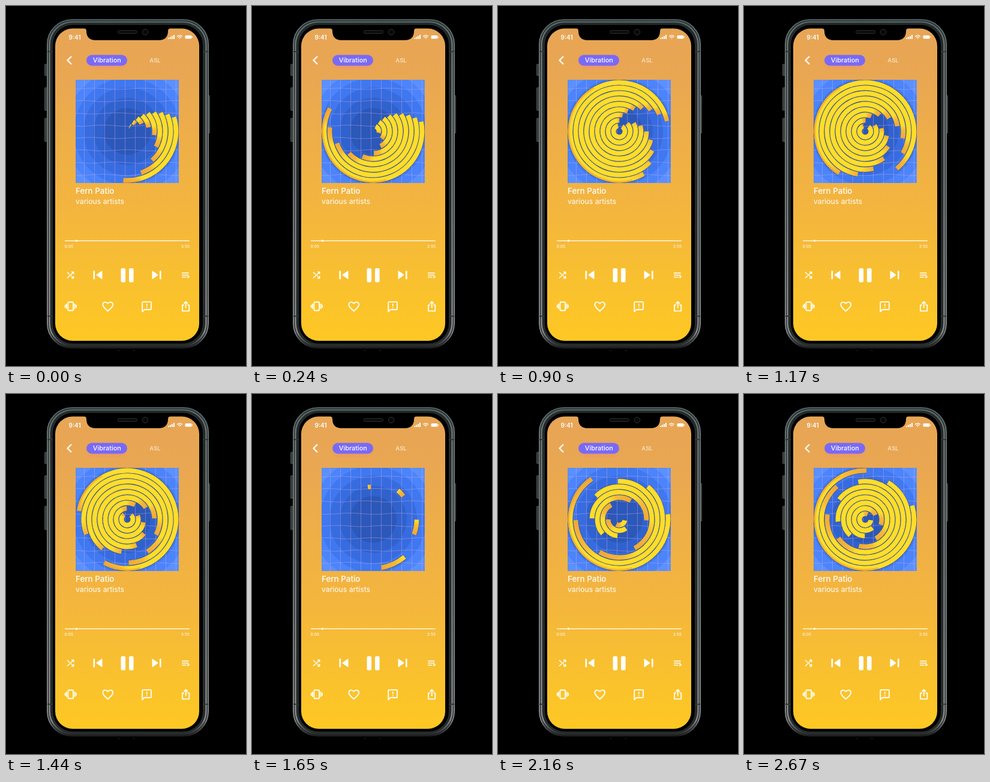
These frames come from a looping animation (400 px wide and 600 px high, 2700 ms). An HTML page with a canvas:

```html
<!DOCTYPE html>
<html lang="en">
<head>
<meta charset="utf-8">
<title>Music player</title>
<style>
html, body { margin: 0; width: 100%; height: 100%; overflow: hidden; background: #000; }
#stage { position: absolute; left: 0; top: 0; width: 400px; height: 600px; overflow: hidden; }
svg, canvas { position: absolute; display: block; }
svg { left: 0; top: 0; }
canvas { left: 116px; top: 123px; }
text { font-family: Inter, "Open Sans", sans-serif; fill: #fff; }
</style>
</head>
<body>
<div id="stage">
<svg width="400" height="600" viewBox="0 0 400 600">
  <defs>
    <linearGradient id="screen" x1="0" y1="0" x2="0" y2="1">
      <stop offset="0" stop-color="#e7a556"/>
      <stop offset=".16" stop-color="#e9a752"/>
      <stop offset=".35" stop-color="#eeae48"/>
      <stop offset=".6" stop-color="#f4b63d"/>
      <stop offset=".78" stop-color="#f8bf31"/>
      <stop offset="1" stop-color="#fec823"/>
    </linearGradient>
    <linearGradient id="metal" gradientUnits="userSpaceOnUse" x1="0" y1="22" x2="0" y2="571">
      <stop offset="0" stop-color="#516363"/>
      <stop offset=".07" stop-color="#687474"/>
      <stop offset=".5" stop-color="#757b7b"/>
      <stop offset=".95" stop-color="#848888"/>
      <stop offset=".985" stop-color="#3c3e3e"/>
      <stop offset="1" stop-color="#151616"/>
    </linearGradient>
    <filter id="soft" x="-30%" y="-80%" width="160%" height="280%"><feGaussianBlur stdDeviation="3"/></filter>
  </defs>
  <rect width="400" height="600"/>

  <g fill="#353a3a" stroke="#626868" stroke-width=".7">
    <rect x="64.5" y="97" width="4" height="19" rx="1"/>
    <rect x="64.5" y="136" width="4" height="38" rx="1"/>
    <rect x="64.5" y="187" width="4" height="39" rx="1"/>
    <rect x="336.5" y="149" width="3" height="63" rx="1"/>
  </g>
  <rect x="69" y="23" width="268" height="547" rx="41" fill="#202424" stroke="url(#metal)" stroke-width="2"/>
  <rect x="72.5" y="26.5" width="261" height="540" rx="38" fill="none" stroke="url(#metal)" stroke-width="2.6"/>
  <rect x="76.5" y="30" width="253" height="534" rx="35" fill="#000" stroke="#272b2b" stroke-width="3"/>
  <path d="M69 76h9M328 76h9M69 517h9M328 517h9" stroke="#303737" stroke-width="2"/>
  <path d="M186 574h4M211 574h4" stroke="#202222"/>

  <rect x="82" y="37.5" width="240" height="520.5" rx="29" fill="url(#screen)"/>
  <path d="M129 37H275Q270 37 270 42C270 52 264 57 255 57H149C140 57 134 52 134 42Q134 37 129 37Z"/>
  <rect x="186.500" y="41" width="32" height="4.500" rx="2.200" fill="#080808" stroke="#343434"/>
  <circle cx="232" cy="43.500" r="4.700" fill="#080808" stroke="#343434"/>

  <text x="104.500" y="55.500" font-size="10" font-weight="600">9:41</text>
  <g fill="#fff">
    <path d="M270 53h2v2h-2zM273 51.500h2v3.500h-2zM276 50h2v5h-2zM279 48h2v7h-2z"/>
    <rect x="298.500" y="49" width="11" height="5.500" rx="1.500"/>
    <rect x="310.300" y="50.700" width="1" height="2.200"/>
  </g>
  <path d="M285.200 50.800Q289.500 47 293.800 50.800M287 52.700Q289.500 50.500 292 52.700M289 54.300h1" fill="none" stroke="#fff" stroke-width="1.300"/>

  <path d="M109 84l-6.500 6.500L109 97" fill="none" stroke="#fff" stroke-width="2.200"/>
  <rect x="136" y="85" width="64" height="18" rx="9" fill="#f08e75" opacity=".65" filter="url(#soft)"/>
  <rect x="134" y="81.500" width="68" height="18" rx="9" fill="#796af6"/>
  <text x="168.300" y="94.300" font-size="10.900" font-weight="500" text-anchor="middle">Vibration</text>
  <text x="248.500" y="94" font-size="9.500" font-weight="600" text-anchor="middle" style="fill:#f6dfbd">ASL</text>

  <text x="116" y="313" font-size="13.400" font-weight="500">Fern Patio</text>
  <text x="116" y="330" font-size="12.200">various artists</text>

  <path d="M98 391.300H306" stroke="#fff" stroke-width="1.300"/>
  <circle cx="117.500" cy="391.300" r="1.700" fill="#fff"/>
  <text x="97.500" y="402.500" font-size="6.800">0:05</text>
  <text x="306" y="402.500" font-size="6.800" text-anchor="end">3:55</text>

  <g fill="#fff">
    <rect x="145.500" y="441" width="2.600" height="14.500" rx="1.200"/>
    <path d="M160.500 442v12.500q0 1-1 .5l-8.500-6q-1-.7 0-1.400l8.500-6q1-.6 1 .4z"/>
    <rect x="191.500" y="437" width="7.600" height="23.500" rx="2.300"/>
    <rect x="205" y="437" width="7.600" height="23.500" rx="2.300"/>
    <path d="M243.500 442v12.500q0 1 1 .5l8.500-6q1-.7 0-1.400l-8.500-6q-1-.6-1 .4z"/>
    <rect x="256" y="441" width="2.600" height="14.500" rx="1.200"/>
    <path d="M302.500 449l4 2.500-4 2.500z"/>
  </g>
  <g fill="none" stroke="#fff" stroke-width="1.500" stroke-linejoin="round">
    <path d="M102 443.500l4 4M108.500 449.500l4 4M102 453.500l10.500-10M109 443.300h3.700v3.700M109 453.700h3.700V450"/>
    <path d="M293 445h11.500M293 448.500h11.500M293 452h7.500"/>
    <g stroke-width="1.800">
      <rect x="103.500" y="493.500" width="8.600" height="14" rx="1"/>
      <path d="M101 496v9M98.700 498v5M114.600 496v9M117 498v5"/>
      <path d="M169.700 508.500C164 503.500 161.300 501 161.300 497.800C161.300 493.200 167 492 169.700 496C172.400 492 178.200 493.200 178.200 497.800C178.200 501 175.400 503.500 169.700 508.500Z"/>
      <path d="M227.200 509.500V494.500q0-1.300 1.300-1.300h12.200q1.300 0 1.300 1.300v10.200q0 1.300-1.300 1.300h-10z"/>
      <path d="M234.700 496v4.500M234.700 502v1.500" stroke-width="1.500"/>
      <path d="M297 498.300h-3v10h11.300v-10h-3M299.700 503.500v-10.500M296.500 496l3.200-3.300 3.200 3.300"/>
    </g>
  </g>
</svg>
<canvas id="art" width="172" height="172"></canvas>
</div>
<script>
const ctx = document.getElementById('art').getContext('2d');
const LOOP = 2700, STEP = 30, CUT = 1490, PERIOD = 1860;
const C = 86, RINGS = 9, PITCH = 9, FULL = 288;
const YELLOW = '#ffdd2a', ORANGE = '#eda83b', LINE = '#3d5590';
const rad = deg => deg * Math.PI / 180;
const clamp = (v, a, b) => Math.min(b, Math.max(a, v));

// time, turn of the outer ring, turn per ring, added length per ring
const windUp = [[0, -17, -6, 0], [480, 0, -8, 0], [900, 60, -15, 4], [1440, 190, -30, 0], [1490, 204, -31.5, 0]];
const settle = [[1490, 75, -52, 0], [1860, 20, -47, 0], [2160, -6, -43, 0], [2700, -17, -42, 0]];

// Smooth curve through the keys of one column
function curve(keys, t, col) {
  let i = 0;
  while (i < keys.length - 2 && t >= keys[i + 1][0]) i++;
  const slope = n => {
    const a = keys[Math.max(0, n - 1)], b = keys[Math.min(keys.length - 1, n + 1)];
    return (b[col] - a[col]) / (b[0] - a[0]);
  };
  const a = keys[i], b = keys[i + 1], d = b[0] - a[0], x = clamp((t - a[0]) / d, 0, 1);
  const s = x * x * (3 - 2 * x);
  return a[col] * (1 - s) + b[col] * s
    + d * x * (1 - x) * ((1 - x) * slope(i) - x * slope(i + 1));
}

function grow(phase, ring) {
  const x = clamp((phase + 370 - 38 * ring) / 880, 0, 1);
  return 0.75 * (0.5 - 0.5 * Math.cos(Math.PI * x)) + 0.25 * x;
}

function arc(r, from, to, width, style) {
  ctx.beginPath();
  ctx.arc(C, C, r, rad(from), rad(to));
  ctx.lineWidth = width;
  ctx.strokeStyle = style;
  ctx.stroke();
}

function backdrop() {
  ctx.fillStyle = '#5c90ff';
  ctx.fillRect(0, 0, 172, 172);
  [[104, '#4c84fb'], [89, '#3f78f0'], [73, '#376ce0'], [56, '#3062ce'], [39, '#2b58b9']].forEach(([r, fill]) => {
    ctx.fillStyle = fill;
    ctx.beginPath();
    ctx.arc(C, C, r, 0, 7);
    ctx.fill();
  });
  ctx.beginPath();
  for (let x = 14.5; x < 172; x += 17) {
    ctx.moveTo(x, 0);
    ctx.lineTo(x, 172);
  }
  for (let y = 15; y < 172; y += 20.5) {
    ctx.moveTo(0, y);
    for (let x = 4; x <= 172; x += 4) ctx.lineTo(x, y + Math.sin(x / 13 + y));
  }
  ctx.lineWidth = 0.8;
  ctx.strokeStyle = 'rgba(205,175,235,.5)';
  ctx.stroke();
}

function paint(from, len, bare, tail) {
  const g = ctx.createConicGradient(rad(from), C, C);
  const stop = (deg, color) => g.addColorStop(clamp(deg / 360, 0, 1), color);
  const start = len - bare;
  stop(0, tail ? `rgb(${255 - 16 * tail},${221 - 48 * tail},${42 + 17 * tail})` : YELLOW);
  stop(Math.min(18, start), YELLOW);
  stop(start, YELLOW);
  stop(start + bare * 0.4, '#f5b936');
  stop(len, ORANGE);
  return g;
}

function draw(t) {
  const second = t >= CUT, keys = second ? settle : windUp;
  const phase = second ? t - PERIOD : t;
  const [turn, lag, extra] = [1, 2, 3].map(col => curve(keys, t, col));
  const tail = clamp((phase - 600) / 500, 0, 1) * (second ? 0 : 1);
  const rings = Array.from({ length: RINGS + 1 }, (_, k) => {
    const from = turn + lag * k;
    const len = FULL * grow(phase, k) + extra * k;
    return { from, len, to: from + len };
  });

  backdrop();
  for (let k = 0; k < RINGS; k++) {
    const { from, len, to } = rings[k];
    if (len < 1) continue;
    const r = C - PITCH * (k + 0.5);
    const bare = Math.min(clamp(to - rings[k + 1].to, 8, 100), len * 0.95);
    arc(r, from, to, PITCH + 0.4, LINE);
    arc(r, from, to, PITCH - 1.2, paint(from, len, bare, tail));
    if (k) continue;
    for (const base of [0, 360]) {
      const a = Math.max(from, base + 75), b = Math.min(to, base + 240);
      if (b > a) arc(C - 2, a, b, 3, 'rgba(237,166,55,.7)');
    }
  }
}

function frame(now) {
  draw(Math.floor(now % LOOP / STEP) * STEP);
  requestAnimationFrame(frame);
}
draw(0);
requestAnimationFrame(frame);
</script>
</body>
</html>
```
